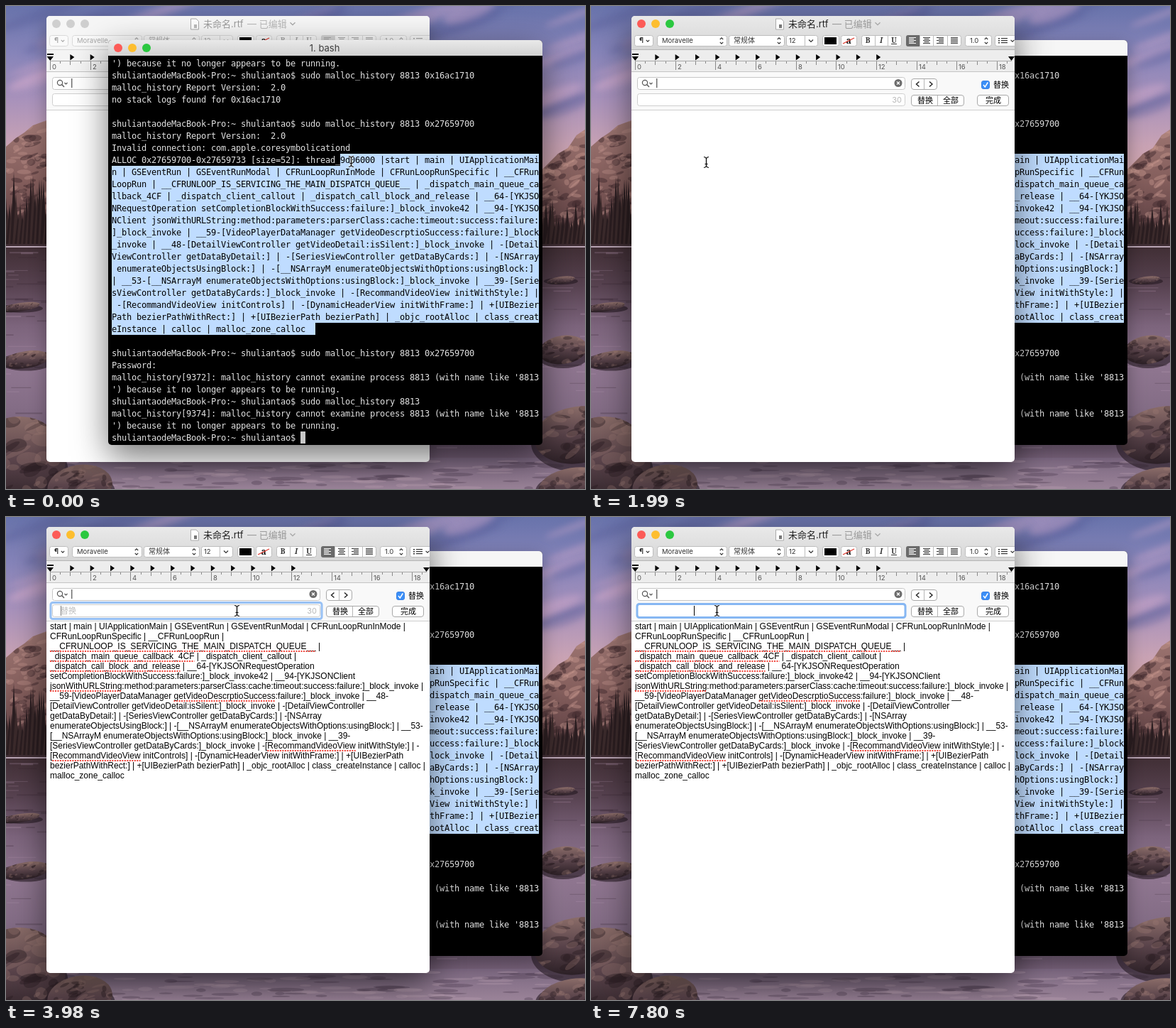
An HTML page with a canvas for the animation above (8 s loop, 816 px wide and 680 px high).

```html
<!DOCTYPE html>
<html lang="zh">
<head>
<meta charset="utf-8">
<title>bash</title>
<style>
html, body { margin: 0; width: 100%; height: 100%; overflow: hidden; background: #4b3d50; }
canvas { display: block; }
</style>
</head>
<body>
<canvas id="stage" width="816" height="680"></canvas>
<script>
const canvas = document.getElementById('stage');
let c = canvas.getContext('2d');
const LOOP = 8000;
const SANS = '"Liberation Sans", "Noto Sans CJK SC", "Noto Sans CJK", sans-serif';
const UI = 'Inter, "Noto Sans CJK SC", "Noto Sans CJK", sans-serif';
const MONO = '"DejaVu Sans Mono", monospace';

const docLines = `start | main | UIApplicationMain | GSEventRun | GSEventRunModal | CFRunLoopRunInMode |
CFRunLoopRunSpecific | __CFRunLoopRun |
__CFRUNLOOP_IS_SERVICING_THE_MAIN_DISPATCH_QUEUE__ |
_dispatch_main_queue_callback_4CF | _dispatch_client_callout |
_dispatch_call_block_and_release | __64-[YKJSONRequestOperation
setCompletionBlockWithSuccess:failure:]_block_invoke42 | __94-[YKJSONClient
jsonWithURLString:method:parameters:parserClass:cache:timeout:success:failure:]_block_invoke |
__59-[VideoPlayerDataManager getVideoDescrptioSuccess:failure:]_block_invoke | __48-
[DetailViewController getVideoDetail:isSilent:]_block_invoke | -[DetailViewController
getDataByDetail:] | -[SeriesViewController getDataByCards:] | -[NSArray
enumerateObjectsUsingBlock:] | -[__NSArrayM enumerateObjectsWithOptions:usingBlock:] | __53-
[__NSArrayM enumerateObjectsWithOptions:usingBlock:]_block_invoke | __39-
[SeriesViewController getDataByCards:]_block_invoke | -[RecommandVideoView initWithStyle:] | -
[RecommandVideoView initControls] | -[DynamicHeaderView initWithFrame:] | +[UIBezierPath
bezierPathWithRect:] | +[UIBezierPath bezierPath] | _objc_rootAlloc | class_createInstance | calloc |
malloc_zone_calloc`.split('\n');
const misspelt = [[2, '__CFRUNLOOP_IS_SERVICING_THE_MAIN_DISPATCH_QUEUE__'],
  [3, '_dispatch_main_queue_callback_4CF'], [4, '_dispatch_call_block_and_release'],
  [6, 'jsonWithURLString'], [7, 'getVideoDescrptioSuccess'],
  [12, 'RecommandVideoView'], [13, 'RecommandVideoView']];

// Terminal contents, wrapped at 86 columns
const trace = docLines.map(l => l.endsWith('-') ? l : l + ' ').join('');
const prompt = 'shuliantaodeMacBook-Pro:~ shuliantao$ ';
const history = prompt + 'sudo malloc_history 8813';
const version = 'malloc_history Report Version:  2.0';
const gone = pid => [`malloc_history[${pid}]: malloc_history cannot examine process 8813 (with name like '8813`,
  "') because it no longer appears to be running."];
const termLines = [gone(0)[1], history + ' 0x16ac1710', version, 'no stack logs found for 0x16ac1710', '',
  history + ' 0x27659700', version, 'Invalid connection: com.apple.coresymbolicationd',
  ...('ALLOC 0x27659700-0x27659733 [size=52]: thread_9d06000 |' + trace + ' ').match(/.{1,86}/g), '',
  history + ' 0x27659700', 'Password:', ...gone(9372), history, ...gone(9374), prompt];

// Pointer path: time, x, y
const pointer = [[0, 486, 219], [59, 486, 219], [60, 491, 219], [209, 491, 219], [530, 534, 221],
  [709, 534, 221], [710, 535, 222], [889, 535, 222], [890, 536, 220], [1070, 530, 224], [1230, 330, 238],
  [1480, 91, 218], [1779, 91, 218], [1780, 92, 219], [1890, 92, 219], [2100, 238, 222], [2600, 238, 222],
  [3150, 333, 158], [3360, 333, 158], [3540, 325, 132], [4340, 325, 132], [4570, 282, 151],
  [4660, 279, 150], [6360, 191, 150], [6540, 181, 149], [6840, 181, 149], [6960, 165, 148],
  [7260, 165, 148], [7320, 177, 132], [8000, 177, 132]];
function pointerAt(t) {
  const i = Math.max(1, pointer.findIndex(k => k[0] > t));
  const a = pointer[i - 1], b = pointer[i], p = (t - a[0]) / (b[0] - a[0]);
  return [a[1] + (b[1] - a[1]) * p, a[2] + (b[2] - a[2]) * p];
}

function rect(x, y, w, h, color) { c.fillStyle = color; c.fillRect(x, y, w, h); }
function box(x, y, w, h, r, fill, stroke, line = 1) {
  c.beginPath();
  c.roundRect(x, y, w, h, r);
  if (fill) { c.fillStyle = fill; c.fill(); }
  if (stroke) { c.strokeStyle = stroke; c.lineWidth = line; c.stroke(); }
}
function text(s, x, y, font, color, align = 'left') {
  c.font = font; c.fillStyle = color; c.textAlign = align;
  c.fillText(s, x, y);
}
function oval(x, y, rx, ry, color, tilt = 0) {
  c.beginPath(); c.ellipse(x, y, rx, ry, tilt, 0, 7); c.fillStyle = color; c.fill();
}
function dot(x, y, r, color) { oval(x, y, r, r, color); }
function poly(points, color) {
  c.beginPath();
  points.forEach(p => c.lineTo(...p));
  c.fillStyle = color; c.fill();
}
function stroke(points, color, width = 1) {
  c.beginPath();
  points.forEach((p, i) => i ? c.lineTo(...p) : c.moveTo(...p));
  c.strokeStyle = color; c.lineWidth = width; c.stroke();
}
function chevron(x, y, color, s = 3) { stroke([[x - s, y - s / 2], [x, y + s / 2], [x + s, y - s / 2]], color, 1.2); }
function stepper(x, y, color) {
  chevron(x, y + 3, color, 2.2);
  stroke([[x - 2.2, y - 2], [x, y - 4.2], [x + 2.2, y - 2]], color, 1.2);
}
function vertical(y0, y1, ...colors) {
  const g = c.createLinearGradient(0, y0, 0, y1);
  colors.forEach((k, i) => g.addColorStop(i / (colors.length - 1), k));
  return g;
}

let seed = 1;
function rnd(min, max) {
  const v = Math.sin(seed++ * 91.7) * 4375.5;
  return min + (max - min) * (v - Math.floor(v));
}
// Scatters soft patches over the shape that was filled last
function mottle(x, y, w, h, count, size, ...colors) {
  c.save();
  c.clip();
  for (let i = 0; i < count; i++)
    oval(rnd(x, x + w), rnd(y, y + h), rnd(size / 2, size * 2), rnd(size / 4, size), colors[i % colors.length], rnd(-.7, .2));
  c.restore();
}

function paintScenery() {
  rect(0, 0, 816, 340, vertical(0, 260, '#6873ab', '#8684b9', '#a791bb', '#c8a2b4', '#d8aaa8'));
  c.filter = 'blur(5px)';
  for (let i = 0; i < 44; i++)
    oval(rnd(0, 816), rnd(-10, 170), rnd(35, 110), rnd(4, 12), i % 3 ? 'rgba(214,172,204,.4)' : 'rgba(88,92,152,.35)', -.35);
  c.filter = 'none';

  const slope = vertical(160, 330, '#a07874', '#845e5c', '#553a3e');
  poly([[0, 198], [14, 186], [26, 178], [38, 168], [60, 160], [300, 250], [300, 340], [0, 340]], slope);
  mottle(0, 160, 70, 150, 90, 5, 'rgba(60,38,44,.45)', 'rgba(190,146,138,.4)');
  poly([[816, 174], [804, 182], [792, 200], [778, 208], [756, 230], [600, 300], [600, 340], [816, 340]], slope);
  mottle(740, 175, 76, 140, 90, 5, 'rgba(60,38,44,.45)', 'rgba(200,152,142,.4)');
  for (let x = -4; x < 820; x += 3) {
    const top = x < 400 ? rnd(232, 300) : rnd(272, 316);
    poly([[x - 5, 337], [x, top], [x + 5, 337]], x % 2 ? '#2a1d20' : '#3b2a2b');
  }

  rect(0, 335, 816, 345, vertical(335, 680, '#3f2d33', '#574250', '#7c647c', '#8f7690', '#846d86', '#715c74', '#80697f'));
  mottle(0, 335, 816, 0, 0, 1);
  for (let i = 0; i < 260; i++)
    rect(rnd(-40, 816), rnd(344, 640), rnd(12, 50), rnd(1, 2.5), i % 2 ? 'rgba(196,164,190,.22)' : 'rgba(48,32,46,.25)');
  rect(0, 338, 816, 2, '#b9a5b4');
  rect(0, 636, 816, 44, vertical(636, 680, '#7b6780', '#9a8398'));
  for (let i = 0; i < 120; i++)
    oval(rnd(0, 816), rnd(640, 680), rnd(6, 26), rnd(1, 3), i % 2 ? 'rgba(184,158,176,.35)' : 'rgba(74,58,78,.35)');

  const rock = (x, y, rx, ry) => {
    oval(x, y + ry * .3, rx + 4, ry, 'rgba(35,24,32,.6)');
    oval(x, y, rx, ry, vertical(y - ry, y + ry, '#8a6c68', '#59434a', '#2c2026'), -.15);
    mottle(x - rx, y - ry, rx * 2, ry * 2, 50, ry / 6, 'rgba(38,26,32,.4)', 'rgba(160,126,118,.28)');
  };
  rock(28, 498, 34, 12); rock(20, 424, 28, 6); rock(785, 484, 34, 20); rock(782, 386, 20, 5);
  rock(18, 640, 66, 62); rock(104, 676, 46, 30); rock(806, 604, 62, 40); rock(800, 676, 50, 26);
}

function trafficLights(x, y, active) {
  ['#fc5b57', '#fdbe2f', '#2bc840'].forEach((k, i) => dot(x + i * 20, y, 6, active ? k : '#cfcfcf'));
}
function shadowed(front, draw) {
  c.save();
  c.shadowColor = `rgba(0,0,0,${front ? .55 : .32})`;
  c.shadowBlur = front ? 48 : 24;
  c.shadowOffsetY = front ? 16 : 8;
  draw();
  c.restore();
}

function paintTerminal(t, front, columnFrom) {
  shadowed(front, () => box(144, 48, 612, 570, 5, '#000'));
  box(144, 48, 612, 22, [5, 5, 0, 0], front ? vertical(48, 70, '#e9e9e9', '#d1d1d1') : t < 1890 ? '#d6d6d6' : '#f6f6f6');
  trafficLights(158, 59, front);
  text('1. bash', 449, 64, '13px ' + UI, '#3b3b3b', 'center');
  c.font = '12px ' + MONO;
  c.letterSpacing = 7 - c.measureText('m').width + 'px';
  termLines.forEach((line, row) => {
    const y = 85 + row * 17;
    const from = row < 8 || row > 22 ? line.length : row === 8 ? columnFrom : 0;
    const end = row === 22 ? 41 : 86;
    text(line.slice(0, from), 149, y, c.font, '#e2e2e2');
    if (from === line.length) return;
    rect(149 + from * 7, y - 13, (end - from) * 7, 17, '#bfdcff');
    text(line.slice(from), 149 + from * 7, y, c.font, '#000');
  });
  c.letterSpacing = '0px';
  rect(415, 599, 7, 17, '#c7c7c7');
}

function paintToolbar(active) {
  const ink = active ? '#333' : '#a8a8a8', edge = active ? '#bdbdbd' : '#dadada', small = '9.5px ' + UI;
  const control = (x, w) => box(x + .5, 41.5, w, 15, 3, active ? '#fff' : '#fafafa', edge);
  [[61, 26], [93, 98], [194, 78], [275, 44], [326, 23], [352, 22], [381, 56], [444, 77], [527, 37]].forEach(b => control(...b));
  box(569.5, 41.5, 40, 15, 3, active ? '#fff' : '#fafafa', edge);
  text('¶', 68, 52, 'bold 10px ' + UI, ink);
  chevron(80, 49, ink, 2.2);
  text('Moravelle', 100, 52, small, ink);
  text('常规体', 201, 52, '10px ' + UI, ink);
  text('12', 279, 52, small, ink);
  text('1.0', 534, 52, small, ink);
  [184, 265, 557].forEach(x => stepper(x, 49, ink));
  rect(301, 42, 1, 14, edge);
  chevron(310, 49, ink);
  rect(329, 44, 17, 10, '#000');
  text('a', 363, 53, 'bold 12px "Noto Serif", serif', '#111', 'center');
  stroke([[355, 53], [371, 45]], '#e03b30', 1.3);
  text('B', 390, 52, 'bold 10px "Noto Serif", serif', ink, 'center');
  text('I', 409, 52, 'italic bold 10px "Noto Serif", serif', ink, 'center');
  text('U', 427, 52, 'bold 10px "Noto Serif", serif', ink, 'center');
  rect(423, 53, 8, 1, ink);
  [400, 418, 463, 482, 502].forEach(x => rect(x, 42, 1, 14, edge));
  box(444, 41, 19, 16, [3, 0, 0, 3], active ? '#6a6a6a' : '#d5d5d5');
  [453, 473, 492, 512].forEach((x, k) => {
    for (let i = 0; i < 5; i++) {
      const w = k < 3 && i % 2 ? 7 : 10;
      rect(x - 5 + [0, (10 - w) / 2, 10 - w, 0][k], 44 + i * 2, w, 1, k || !active ? ink : '#fff');
    }
  });
  for (let i = 0; i < 3; i++) { rect(574, 45 + i * 3, 2, 1.5, ink); rect(578, 45 + i * 3, 9, 1.2, ink); }
  chevron(594, 49, ink, 2.4);
}

function paintRuler(active) {
  rect(57, 62, 540, 31, active ? '#ededed' : '#f4f4f4');
  rect(57, 61, 540, 1, active ? '#b5b5b5' : '#d8d8d8');
  rect(57, 92, 540, 1, '#c4c4c4');
  rect(62, 77, 531, 1, '#aaa');
  for (let i = 0; i < 38; i++) {
    const x = Math.round(62 + i * 14.17);
    rect(x, 78, 1, i % 4 ? i % 2 ? 3 : 5 : 12, '#888');
    if (i % 4 === 0) text(i / 2, x + 3, 89, '9.5px ' + UI, '#555');
  }
  for (let i = 1; i <= 12; i++) {
    const x = 62 + i * 28.35;
    poly([[x, 68], [x + 6, 72], [x, 76.5]], '#000');
  }
  rect(58, 67, 9, 2, '#000');
  poly([[57.5, 71], [67, 71], [62.3, 77]], '#000');
  poly([[588, 71], [597, 71], [592.5, 77]], '#000');
}

function paintFindBar(t, active) {
  rect(57, 93, 540, 54, '#f9f9f9');
  rect(57, 146, 540, 1, '#cfcfcf');
  box(65.5, 100.5, 377, 17, 3, '#fff', '#c6c6c6');
  box(65.5, 123.5, 377, 17, 3, '#fff', '#cfcfcf');
  c.beginPath(); c.arc(76, 108, 3.6, 0, 7); c.strokeStyle = '#555'; c.lineWidth = 1.2; c.stroke();
  stroke([[78.6, 110.6], [82, 114]], '#555', 1.4);
  chevron(84.5, 109, '#555', 2);
  text('|', 91, 113, '11px ' + UI, '#000');
  dot(433, 108.5, 5.5, '#6c6c6c');
  stroke([[431, 106.5], [435, 110.5]], '#fff', 1.2);
  stroke([[435, 106.5], [431, 110.5]], '#fff', 1.2);
  box(451.5, 102.5, 36, 15, 3.5, '#fff', '#a9a9a9');
  box(451.5, 125.5, 74, 15, 3.5, '#fff', '#a9a9a9');
  box(544.5, 125.5, 44, 15, 3.5, '#fff', '#a9a9a9');
  rect(469, 103, 1, 14, '#b5b5b5');
  rect(488, 126, 1, 14, '#b5b5b5');
  stroke([[462.5, 106.5], [458.5, 110], [462.5, 113.5]], '#222', 1.4);
  stroke([[477, 106.5], [481, 110], [477, 113.5]], '#222', 1.4);
  const label = '11px ' + UI;
  text('替换', 460, 137, label, '#000');
  text('全部', 496, 137, label, '#000');
  text('完成', 556, 137, label, '#000');
  text('替换', 567, 115, label, '#000');
  box(550.5, 105.5, 11, 11, 2.5, active ? '#3b8ff7' : '#fff', active ? '#3b82e6' : '#aaa');
  stroke([[553, 111], [555.3, 114], [559.3, 107.5]], active ? '#fff' : '#222', 1.5);
  if (t < 4340) text('30', 438, 136, label, '#b9b9b9', 'right');
  if (t >= 3750) paintReplaceField(t);
}

function paintReplaceField(t) {
  const arrive = Math.min(1, (t - 3750) / 290), out = 10 * (1 - arrive);
  c.globalAlpha = .25 + .75 * arrive;
  box(65 - out, 122.5 - out, 378 + 2 * out, 19 + 2 * out, 3, null, '#86b7f3', 3);
  c.globalAlpha = 1;
  const spaces = t >= 7800 ? 22 : t >= 5420 ? Math.min(11, 2 + Math.floor((t - 5420) / 77.7)) : t >= 5120 ? 1 : 0;
  if (!spaces) text('替换', 77, 136, '11px ' + UI, '#bdbdbd');
  if (t >= 6360 && t < 7560) rect(76, 125, 35, 14, '#b4d7fe');
  else if (!(t >= 4040 && t < 4340 || t >= 4860 && t < 5120)) rect(Math.round(76.5 + spaces * 3.1), 125, 1, 14, spaces ? '#000' : '#777');
}

function paintDocument(t) {
  const font = '12px ' + SANS;
  if (t < 2490) {
    if (t >= 2100 && t < 2340) rect(62, 147, 1, 14, '#000');
    return;
  }
  docLines.forEach((line, i) => text(line, 62, 158 + i * 14, font, '#000'));
  if (t >= 3000) {
    c.setLineDash([2, 1.5]);
    misspelt.forEach(([row, word]) => {
      const line = docLines[row], y = 161 + row * 14;
      const x = 62 + c.measureText(line.slice(0, line.indexOf(word))).width;
      stroke([[x, y], [x + c.measureText(word).width, y]], '#f0443a', 2);
    });
    c.setLineDash([]);
  }
  if (t < 3150 || t >= 3360 && t < 3750) rect(166, 357, 1, 14, '#000');
}

function paintEditor(t, front) {
  const active = t >= 1890;
  shadowed(front, () => box(57, 14, 540, 628, 5, '#fff'));
  box(57, 14, 540, 48, [5, 5, 0, 0], active ? vertical(14, 62, '#e9e9e9', '#d6d6d6') : '#f6f6f6');
  c.save();
  c.beginPath(); c.rect(57, 14, 540, 628); c.clip();
  trafficLights(71, 25, active);
  poly([[260.5, 18], [268, 18], [271.5, 21.5], [271.5, 33], [260.5, 33]], active ? '#fff' : '#fdfdfd');
  stroke([[260.5, 18], [268, 18], [271.5, 21.5], [271.5, 33], [260.5, 33], [260.5, 18]], '#aaa');
  rect(265, 26, 4, 5, active ? '#777' : '#bbb');
  text('未命名.rtf', 278, 30, '13px ' + UI, active ? '#222' : '#9c9c9c');
  text('— 已编辑', 340, 30, '13px ' + UI, active ? '#9a9a9a' : '#b8b8b8');
  chevron(404, 25, '#a5a5a5', 3.5);
  paintToolbar(active);
  paintRuler(active);
  paintFindBar(t, active);
  paintDocument(t);
  c.restore();
}

function paintPointer(t, x, y) {
  if (t >= 5120 && t < 6360) return;
  x = Math.round(x); y = Math.round(y);
  if (t >= 890 && t < 1780) {
    const arrow = [[0, 0], [0, 15], [3.5, 12], [6, 17.5], [8.5, 16.5], [6.2, 11], [11, 11]].map(p => [x + p[0], y + p[1]]);
    stroke([...arrow, arrow[0]], '#fff', 2);
    poly(arrow, '#000');
    return;
  }
  [['rgba(255,255,255,.75)', 2.6], ['#111', 1.2]].forEach(([color, w]) => {
    stroke([[x - 3, y - 7.5], [x - 1, y - 7], [x + .5, y - 5.5], [x + .5, y + 5.5], [x - 1, y + 7], [x - 3, y + 7.5]], color, w);
    stroke([[x + 4, y - 7.5], [x + 2, y - 7], [x + .5, y - 5.5], [x + .5, y + 5.5], [x + 2, y + 7], [x + 4, y + 7.5]], color, w);
    stroke([[x - 1.5, y + 2.5], [x + 2.5, y + 2.5]], color, w);
  });
}

const scenery = Object.assign(document.createElement('canvas'), { width: 816, height: 680 });
const stage = c;
c = scenery.getContext('2d');
paintScenery();
c = stage;

let start;
function frame(now) {
  start ??= now;
  const t = (now - start) % LOOP;
  const [x, y] = pointerAt(t);
  const column = t < 60 ? 46 : Math.min(55, t >= 530 ? 55 : Math.floor((x - 149) / 7));
  const editorFront = t >= 1780;
  c.drawImage(scenery, 0, 0);
  if (editorFront) {
    paintTerminal(t, false, column);
    paintEditor(t, true);
  } else {
    paintEditor(t, false);
    paintTerminal(t, true, column);
  }
  paintPointer(t, x, y);
  requestAnimationFrame(frame);
}
requestAnimationFrame(frame);
</script>
</body>
</html>
```
